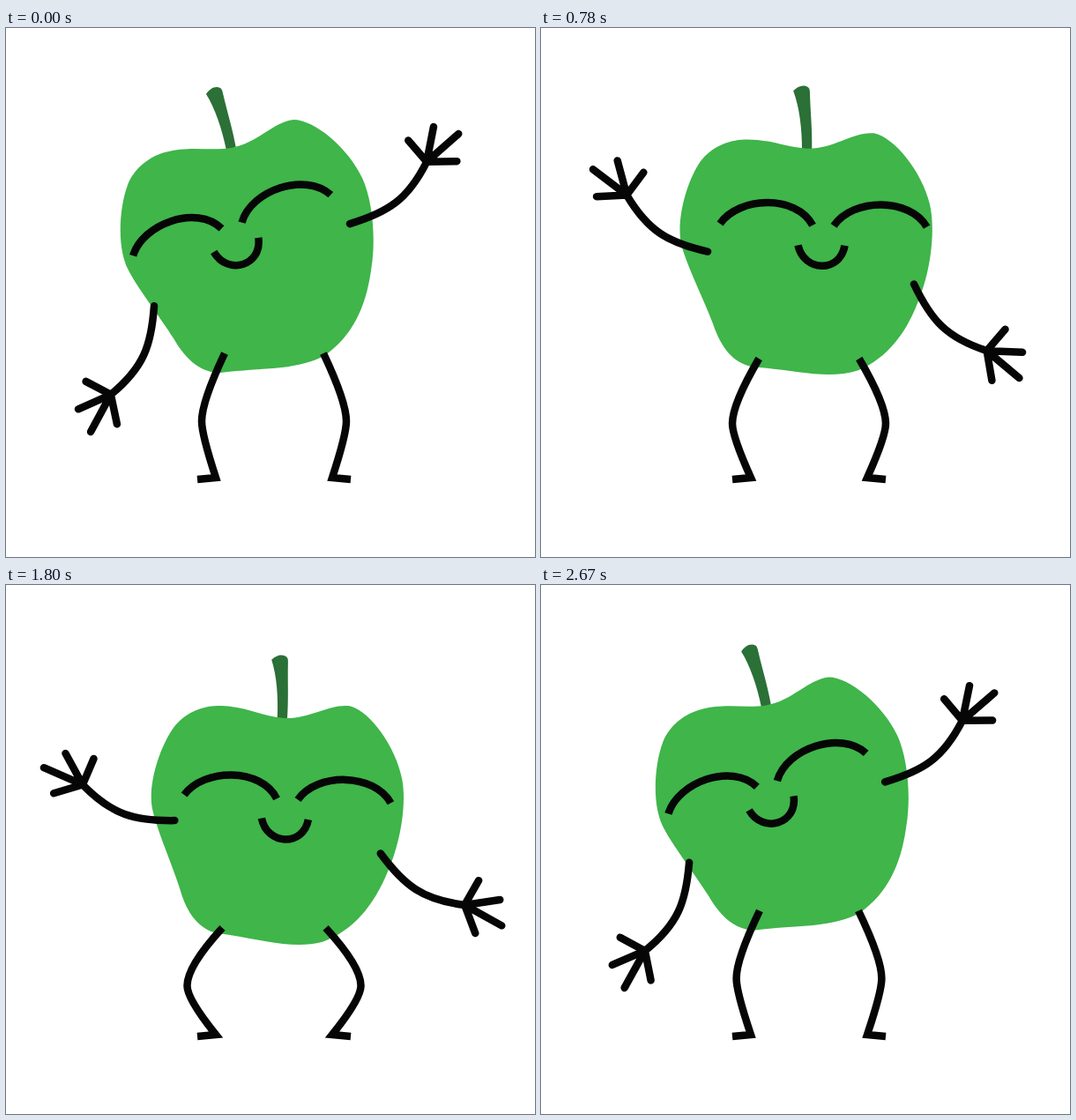
Write an HTML page that moves like this. It is 600 px wide and 600 px high and loops after 2.7 s.

```html
<!DOCTYPE html>
<html lang="en">
<head>
<meta charset="utf-8">
<title>Dancing apple</title>
<style>
html, body { margin: 0; width: 100%; height: 100%; overflow: hidden; background: #fff; }
svg { display: block; width: 100%; height: 100%; }
.line { fill: none; stroke: #060606; stroke-width: 8.5; }
.round { stroke-linecap: round; stroke-linejoin: round; }
</style>
</head>
<body>
<svg viewBox="0 0 600 600">
  <defs>
    <path id="arm" class="line round" d="M0 0C42 17 68 20 112 0L111 -32M112 0L143 -26M112 0L160 -2M112 0L139 21"/>
    <path id="leg" class="line"/>
  </defs>
  <g id="body">
    <path fill="#2b7036" d="M227 75C231 69 237 65 243 68Q245 69 246 74C250 92 257 114 261 137L250 139C245 114 237 91 227 75Z"/>
    <path fill="#3fb54a" d="M255 136C285 131 302 107 326 104C350 104 388 136 404 170C416 196 420 240 414 275C408 318 392 350 362 371C330 389 290 385 243 391C222 391 205 378 190 352C175 328 149 295 138 273C126 249 128 205 138 178C146 158 163 146 180 141C210 133 230 140 255 136Z"/>
  </g>
  <use href="#leg"/>
  <use href="#leg" transform="translate(608) scale(-1 1)"/>
  <use id="left" href="#arm"/>
  <use id="right" href="#arm"/>
  <path id="face" class="line" d="M-115.5 -21.5C-95 -53 -30 -57 -10.5 -22.5M13.5 -22.5C34 -55 99 -57 119 -24M-26.5 .5C-19 31 22 31 26.5 -.5"/>
</svg>
<script>
const LOOP = 2700, HALF = LOOP / 2, BEAT = HALF / 2;
const $ = id => document.getElementById(id);
const place = (id, transform) => $(id).setAttribute('transform', transform);

// Poses over one sway from left to right; the sway back mirrors them.
const times = [0, 420, 670, 780, 1155, HALF];
const tracks = {
  tilt:   [0, 4.3, 8.9, 11.4, 19.7, 21.5],
  faceX:  [261, 294, 313, 318, 309.5, 307],
  faceY:  [245.5, 243.5, 238.5, 243.3, 239.3, 239],
  faceA:  [-16.5, -8, -0.3, 1.5, 5, 5.5],
  leftX:  [168, 177, 183.5, 189, 195, 199],
  leftY:  [315, 275, 251.5, 246, 259, 260],
  leftA:  [-64, 1, 39, 35, -19.3, -33],
  rightX: [390, 408, 421, 423, 427.5, 428],
  rightY: [222, 255, 280.5, 286, 269.7, 265],
  rightA: [38.9, -13.3, -46, -42.5, 0, 10.7]
};

// Monotone cubic interpolation, at rest at both ends.
function sample(values, t) {
  const last = times.length - 1;
  const slope = i => (values[i + 1] - values[i]) / (times[i + 1] - times[i]);
  const tangent = i => {
    if (i === 0 || i === last) return 0;
    const a = slope(i - 1), b = slope(i);
    return a * b > 0 ? 2 * a * b / (a + b) : 0;
  };
  let i = 0;
  while (i < last - 1 && t > times[i + 1]) i++;
  const span = times[i + 1] - times[i], u = (t - times[i]) / span, v = 1 - u;
  return v * v * (1 + 2 * u) * values[i] + u * u * (3 - 2 * u) * values[i + 1]
    + span * u * v * (v * tangent(i) - u * tangent(i + 1));
}

const bobAt = t => 13.35 * (1 - Math.cos(2 * Math.PI * t / BEAT));

function draw(t) {
  const m = HALF - Math.abs(HALF - t), bob = bobAt(t), p = {};
  for (const key in tracks) p[key] = sample(tracks[key], m);

  place('body', `translate(0 ${bob}) rotate(${p.tilt} 305 366)`);
  // The left arm leads the bounce a little; the right arm and the face trail it.
  place('left', `translate(${p.leftX} ${p.leftY + bobAt(t + 15)}) scale(-1 1) rotate(${-p.leftA})`);
  place('right', `translate(${p.rightX} ${p.rightY + bobAt(t - 15)}) rotate(${-p.rightA})`);
  place('face', `translate(${p.faceX} ${p.faceY + bobAt(t - 30)}) rotate(${p.faceA})`);

  const knee = 222 - .83 * bob, drop = .43 * bob;
  $('leg').setAttribute('d', `M${248 - .13 * bob} ${369 + bob}Q${knee} ${424 + drop} ${knee} ${446 + drop}`
    + `Q${knee} ${461 + drop} 238 510L217 512`);
}

function tick() {
  draw(performance.now() % LOOP);
  requestAnimationFrame(tick);
}
tick();
</script>
</body>
</html>
```
